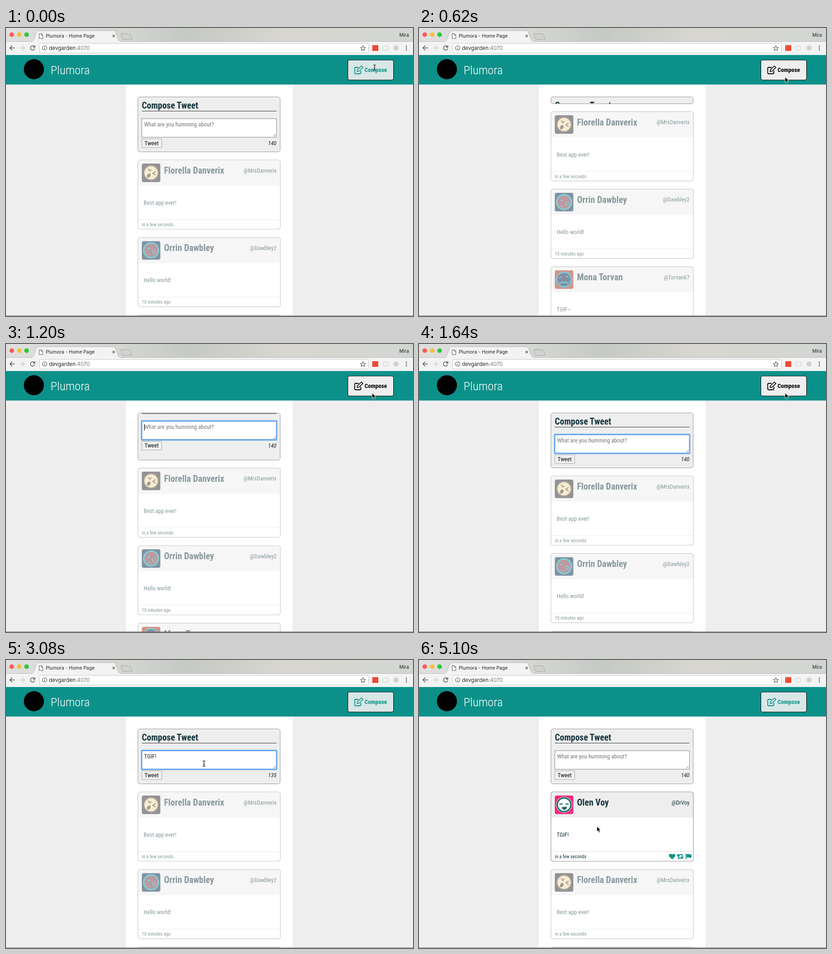
Animation of 890 by 629 pixels, one loop 5.12 s. Source, as an HTML page:

```html
<!DOCTYPE html>
<html lang="en">
<head>
<meta charset="utf-8">
<title>Compose demo</title>
<style>
  html, body { margin: 0; width: 100%; height: 100%; overflow: hidden; background: #eee; }
  #stage { position: relative; width: 890px; height: 629px; overflow: hidden; }
  svg { position: absolute; left: 0; top: 0; overflow: visible; }
  text { font-family: "Roboto Condensed", Roboto, "Liberation Sans", sans-serif; font-stretch: 75%; white-space: pre; }
  .wide { font-family: Roboto, "Liberation Sans", sans-serif; font-stretch: 100%; }
  .ui { font-family: Inter, Roboto, sans-serif; font-stretch: 100%; }
  #compose {
    position: absolute; left: 288px; top: 150px; width: 312px; height: 121px;
    box-sizing: border-box; overflow: hidden;
    background: #eee; border: 1px solid #999; border-radius: 5px;
  }
  #form { left: -1px; top: -1px; }
</style>
</head>
<body>
<div id="stage">
  <svg width="890" height="629" viewBox="0 0 890 629">
    <defs>
      <linearGradient id="strip">
        <stop offset="0" stop-color="#dfdfdd"/>
        <stop offset=".3" stop-color="#d3d5d1"/>
        <stop offset=".45" stop-color="#c5c9c4"/>
        <stop offset=".68" stop-color="#d8d6d0"/>
        <stop offset="1" stop-color="#d2d6d2"/>
      </linearGradient>
    </defs>
    <rect width="890" height="30" fill="url(#strip)"/>
    <circle cx="12.5" cy="14.5" r="5" fill="#fc5b57"/>
    <circle cx="29" cy="14.5" r="5" fill="#f9bd3c"/>
    <circle cx="45" cy="14.5" r="5" fill="#2fc440"/>
    <rect y="29" width="890" height="30" fill="#f3f3f3"/>
    <path d="M0 29.5H57" stroke="#bbb"/>
    <path d="M250 29.5H890" stroke="#bbb"/>
    <path d="M56 30q3 0 4-3l7-18q1-3 4-3h164q3 0 4 3l7 18q1 3 5 3z" fill="#f3f3f3" stroke="#aaa" stroke-width=".7"/>
    <path d="M57 29h193v3H57z" fill="#f3f3f3"/>
    <path d="M72.5 12.5h5l3 3v7.5h-8zM77.5 12.5v3h3" fill="#fff" stroke="#555"/>
    <text class="ui" x="87" y="21" font-size="10.3" fill="#222">Plumora - Home Page</text>
    <path d="M233 15l5 5m0-5l-5 5" stroke="#555" stroke-width="1.2"/>
    <path d="M251 12.5h18q2 0 3 2l4 10.5h-19q-2 0-3-2z" fill="#d0d2cf" stroke="#a5a7a4"/>
    <text class="ui" x="860" y="19" font-size="10.2" fill="#222">Mira</text>

    <g fill="none" stroke="#555" stroke-width="1.5">
      <path d="M19 43.5H8.5m5-5l-5 5 5 5"/>
      <path d="M30 43.5h10.5m-5-5l5 5-5 5" stroke="#ccc"/>
      <path d="M62 40.5a4.8 4.8 0 1 0 .8 4.5M63 38v4h-4"/>
    </g>
    <rect x="73.5" y="33.5" width="719" height="21" rx="3" fill="#fff" stroke="#c8c8c8"/>
    <circle cx="84.5" cy="43.5" r="4.8" fill="none" stroke="#555" stroke-width="1.1"/>
    <path d="M84.5 43v3.5M84.5 40.5v1.3" stroke="#555" stroke-width="1.3"/>
    <text class="ui" x="94" y="48" font-size="11.5" fill="#222">devgarden<tspan fill="#777">:4070</tspan></text>
    <path d="M780.5 38.5l1.5 3.7 4 .3-3 2.6 1 3.9-3.5-2.1-3.5 2.1 1-3.9-3-2.6 4-.3z" fill="none" stroke="#555" stroke-width="1.1"/>
    <rect x="801" y="37.5" width="13" height="12.5" rx="1" fill="#ee4a33"/>
    <rect x="824.5" y="39.5" width="11" height="8.5" rx="1" fill="none" stroke="#ccc"/>
    <circle cx="853" cy="43.5" r="5.5" fill="#d0d0d0"/>
    <g fill="#555"><circle cx="875.5" cy="39.5" r="1.3"/><circle cx="875.5" cy="43.7" r="1.3"/><circle cx="875.5" cy="47.9" r="1.3"/></g>

    <rect y="59" width="890" height="570" fill="#eee"/>
    <rect x="262" y="123" width="364.5" height="506" fill="#fff"/>
    <rect y="59" width="890" height="64.5" fill="#0c918a"/>
    <circle cx="61" cy="90" r="22" fill="#000"/>
    <g id="brand"></g>
  </svg>

  <svg id="list" width="890" height="629" viewBox="0 0 890 629"></svg>
  <div id="compose"><svg id="form" width="312" height="121" viewBox="288 150 312 121"></svg></div>

  <svg width="890" height="629" viewBox="0 0 890 629">
    <g id="button"></g>
    <path d="M0 628.5H890" stroke="#777"/>
    <g id="cursor">
      <path id="arrow" d="M0 0v11.5l2.7-2.5 2 4.6 2.2-1-2-4.5h3.6z" fill="#000" stroke="#fff" stroke-width=".9"/>
      <g id="beam" fill="none">
        <path d="M-3-6q3 0 3 2v8q0 2-3 2M3-6q-3 0-3 2M3 6q-3 0-3-2M-1.5 1h3" stroke="#fff" stroke-width="2.4" opacity=".5"/>
        <path d="M-3-6q3 0 3 2v8q0 2-3 2M3-6q-3 0-3 2M3 6q-3 0-3-2M-1.5 1h3" stroke="#111" stroke-width="1.2"/>
      </g>
    </g>
  </svg>
</div>

<script>
const LOOP = 5120;
const CLOSE = 315, SHUT = 715, OPEN = 900, READY = 1300, POST = 3600;
const KEYS = [2160, 2270, 2370, 2470, 2570];
const WORD = 'TGIF!';
const INK = '#15343c', TEAL = '#0c918a';
const SWING = 'cubic-bezier(.37,0,.63,1)';

const $ = id => document.getElementById(id);

// Narrow the regular face only when no condensed face is installed.
function narrowing() {
  const sample = 'Compose something narrow';
  $('brand').innerHTML = `<text font-size="40">${sample}</text><text class="wide" font-size="40">${sample}</text>`;
  const [slim, wide] = [...$('brand').children].map(t => t.getComputedTextLength());
  return slim / wide > .95 ? .88 : 1;
}
const SX = narrowing();

function text(x, y, size, str, { w = 400, fill = INK, end = false, more = '' } = {}) {
  return `<text transform="translate(${x} ${y}) scale(${SX} 1)" font-size="${size}" font-weight="${w}"
    fill="${fill}" text-anchor="${end ? 'end' : 'start'}" ${more}>${str}</text>`;
}

// Frames are [ms, properties, easing].
function play(el, frames) {
  el.animate(frames.map(([ms, props, easing = 'linear']) => ({ ...props, easing, offset: ms / LOOP })),
    { duration: LOOP, iterations: Infinity });
}

// Switches between low and full opacity at each time given; a first time of 0 starts it on.
function flip(el, times, low = 0) {
  let on = times[0] === 0;
  const state = () => ({ opacity: on ? 1 : low });
  const frames = [[0, state(), 'step-end']];
  for (const ms of times.filter(ms => ms > 0)) {
    on = !on;
    frames.push([ms, state(), 'step-end']);
  }
  play(el, [...frames, [LOOP, state()]]);
}

const disc = (r, fill, more = '') => `<circle r="${r}" fill="${fill}" ${more}/>`;
const lines = (d, color, width = 2) => `<path d="${d}" fill="none" stroke="${color}" stroke-width="${width}"/>`;

const people = {
  florella: {
    name: 'Florella Danverix', handle: '@MrsDanverix', says: 'Best app ever!', when: 'in a few seconds', bg: '#28292f',
    face: disc(17, '#594a35') + disc(14.5, '#f4d9a2') +
      lines('M-6-9l3 5 4-3M10-3l-6 4 6 4', '#42382e', 2) +
      '<ellipse cx="-5" cy="6" rx="3.6" ry="5" transform="rotate(35 -5 6)" fill="#42382e"/>'
  },
  orrin: {
    name: 'Orrin Dawbley', handle: '@Dawbley2', says: 'Hello world!', when: '10 minutes ago', bg: '#04284c',
    face: disc(16, '#7a3444', 'stroke="#0aa6ac" stroke-width="3"') +
      '<circle cx="-5" cy="-4" r="2.2" fill="#0aa6ac"/>' +
      lines('M3 3a3.5 3.5 0 1 0 7 0a3.5 3.5 0 1 0-7 0M-7 7q3 3 6 2', '#0aa6ac', 1.6) +
      '<circle cx="3" cy="-7" r="1.5" fill="#c0283c"/><circle cx="-9" cy="3" r="1.5" fill="#c0283c"/>'
  },
  mona: {
    name: 'Mona Torvan', handle: '@Torvan67', says: 'TGIF~', when: '2 hours ago', bg: '#a62c0c',
    face: disc(16, '#06203e', 'stroke="#0a90bd" stroke-width="3"') +
      lines('M-10-2q2-6 6-3M3-7q5-2 6 3M-11 5l4 3 3-4 4 4 3-4 4 4 3-4', '#0a90bd')
  },
  olen: {
    name: 'Olen Voy', handle: '@DrVoy', says: 'TGIF!', when: 'in a few seconds', bg: '#f8287c',
    face: disc(17.5, '#fff') + disc(15, '#fff', 'stroke="#1c6b69" stroke-width="3.2"') +
      lines('M-10-1l7-1M3-2l7 1', '#1c6b69', 2.2) +
      '<path d="M-5 5l11-1q0 7-5 7t-6-6z" fill="#1c6b69"/>'
  }
};

const actions = `<g id="actions" fill="${TEAL}">
  <path d="M553.5 435.5l-6-6q-2-3 0-5.3 3-2.2 6 .8 3-3 6-.8 2 2.3 0 5.3z"/>
  <path d="M563 428l4-5 4 5zM571.500 430h8l-4 5z"/>
  ${lines('M567 427v6h6M575.500 431v-6h-6', TEAL)}
  <path d="M583 423h1.7v12.5H583zM585.3 424.5q3-1.8 5.5-.3t5-.3v7.3q-2.5 1.6-5 .3t-5.5.3z"/>
</g>`;

function card(key, row) {
  const p = people[key];
  return `<g transform="translate(0 ${row * 169.4})"><g class="card" opacity=".5">
    <rect x="288.5" y="288" width="311.5" height="151.5" rx="5" fill="#fff"/>
    <path d="M288.5 344v-51q0-5 5-5h301.5q5 0 5 5v51z" fill="#eee"/>
    <rect x="297" y="296" width="40.5" height="40.5" rx="4" fill="${p.bg}"/>
    <g transform="translate(317.2 316.2)">${p.face}</g>
    ${text(345.5, 318, 19.6, p.name, { w: 700 })}
    ${text(591.5, 315.5, 12.7, p.handle, { end: true })}
    ${text(301, 386, 12.8, p.says)}
    <path d="M289 418.5H600" stroke="#ddd"/>
    ${text(297, 433, 10.4, p.when)}
    ${key === 'olen' ? actions : ''}
    <rect x="288.5" y="288" width="311.5" height="151.5" rx="5" fill="none" stroke="#999" stroke-width="1.2"/>
  </g></g>`;
}

const feed = (id, ...keys) => `<g id="${id}">${keys.map(card).join('')}</g>`;

const button = (id, ink, bg) => `<g id="${id}">
  <rect x="747.5" y="70" width="100" height="43.5" rx="4" fill="${bg}" stroke="#111" stroke-width="1.2"/>
  <path d="M776 93.5v4q0 2.5-2.5 2.5h-8.5q-2.5 0-2.5-2.5v-9q0-2.5 2.5-2.5h6" fill="none" stroke="${ink}" stroke-width="1.8"/>
  <path d="M768 95l.8-4 8.2-8 3.5 3.3-8.3 8z" fill="${bg}" stroke="${ink}" stroke-width="1.6"/>
  ${text(784, 96, 13.1, 'Compose', { w: 700, fill: ink })}
</g>`;

const counter = n => text(591.5, 256, 12.8, n, { fill: '#222', end: true, more: 'font-style="italic"' });

// One layer per stage of the typing: words, caret and characters left.
const typed = (_, i) => `<g id="typed${i}">
  ${i ? text(302, 215, 12.8, WORD.slice(0, i), { fill: '#222' })
      : text(302, 215, 12.8, 'What are you humming about?', { fill: '#777' })}
  <path class="caret" d="M302.5 204v15" stroke="#000"/>
  ${counter(140 - i)}
</g>`;

$('brand').innerHTML = text(97.5, 100.5, 26.5, 'Plumora', { w: 300, fill: '#fff' });
$('list').innerHTML = feed('before', 'florella', 'orrin', 'mona') + feed('after', 'olen', 'florella', 'orrin');
$('button').innerHTML = button('rest', TEAL, '#d9e7e6') + button('hover', '#000', '#eee');
$('form').innerHTML = `<g id="scroll">
  ${text(297, 176.2, 19.4, 'Compose Tweet', { w: 700 })}
  <path d="M297 181.5H591.5" stroke="#333" stroke-width="1.2"/>
  <rect x="297" y="198" width="294.5" height="40.5" fill="#fff" stroke="#888"/>
  <path d="M584.5 236.5l5-5M587.5 236.5l2-2" stroke="#777"/>
  <g id="focus" fill="none" stroke="#4d97ea">
    <rect x="296" y="197" width="296.5" height="42.5" rx="2" stroke-width="2.8" opacity=".4"/>
    <rect x="297" y="198" width="294.5" height="40.5" rx="1" stroke-width="1.8"/>
  </g>
  <rect x="297" y="242" width="43.5" height="19" fill="#f0f0f0" stroke="#aaa"/>
  ${text(303, 255.5, 13, 'Tweet', { fill: '#111' })}
  ${Array.from({ length: WORD.length + 1 }, typed).join('')}
</g>`;

// Panel slides shut, then open again with its content scrolled up.
play($('compose'), [
  [0, { height: '121px' }], [CLOSE, { height: '121px' }, SWING], [SHUT, { height: '0px' }],
  [OPEN, { height: '0px' }, SWING], [READY, { height: '121px' }], [LOOP, { height: '121px' }]
]);
flip($('compose'), [0, SHUT, OPEN]);

const up = y => ({ transform: `translate(0px, ${-y}px)` });
play($('list'), [
  [0, up(0)], [CLOSE, up(0), SWING], [SHUT, up(121)], [SHUT, up(138)],
  [OPEN, up(138)], [OPEN, up(121), SWING], [READY, up(0)], [LOOP, up(0)]
]);
play($('scroll'), [
  [0, up(0)], [OPEN, up(0)], [OPEN, up(30)], [1200, up(30), 'cubic-bezier(.3,.5,.6,1)'],
  [READY, up(0)], [LOOP, up(0)]
]);

// Typing
flip($('focus'), [OPEN, POST - 40]);
const stops = [...KEYS, POST];
for (let i = 0; i <= WORD.length; i++) {
  const layer = $('typed' + i), caret = layer.querySelector('.caret');
  flip(layer, i ? [stops[i - 1], stops[i]] : [0, stops[0], POST]);
  if (i) {
    const width = layer.querySelector('text').getComputedTextLength() * SX;
    caret.setAttribute('transform', `translate(${width} 0)`);
  }
  if (i === 0) flip(caret, [OPEN, 1400, 1900, KEYS[0]]);
  if (i === WORD.length) flip(caret, [KEYS[4], KEYS[4] + 500]);
}

// Feed and hover states
const newest = $('after').querySelector('.card');
flip($('before'), [0, POST]);
flip($('after'), [POST]);
flip(newest, [4520], .5);
flip($('actions'), [4520]);
flip($('hover'), [60, 1780]);
flip($('rest'), [0, 60, 1780]);

// Pointer
const at = (x, y) => ({ transform: `translate(${x}px, ${y}px)` });
play($('cursor'), [
  [0, at(806, 86), 'ease-out'], [140, at(800.5, 107)],
  [1680, at(800.5, 107), 'ease-in-out'], [2120, at(433, 226)],
  [3120, at(433, 226), 'ease-in-out'], [3440, at(323.5, 254.5)],
  [4320, at(323.5, 254.5), 'ease-in-out'], [4780, at(389, 363.5)], [LOOP, at(389, 363.5)]
]);
flip($('beam'), [0, 60, 1970, 3270]);
flip($('arrow'), [60, 1970, 3270]);
</script>
</body>
</html>
```
